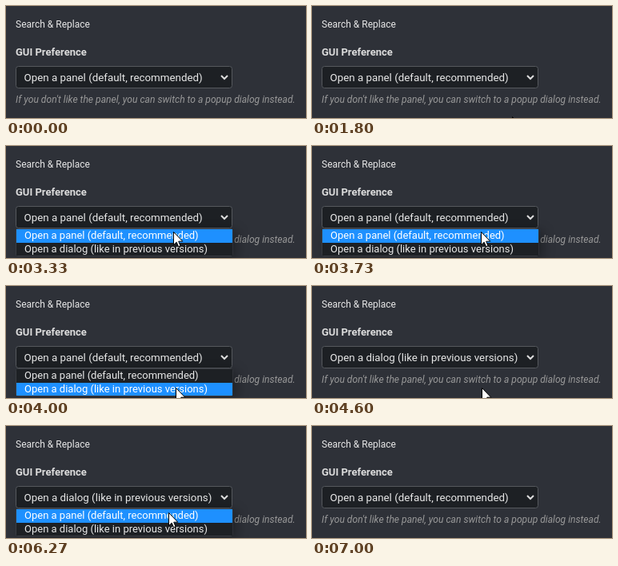
Recreate the animation shown at these times as an HTML page. Size 375x140 px, loop 8.39 s.

```html
<!DOCTYPE html>
<html lang="en">
<head>
<meta charset="utf-8">
<title>GUI preference</title>
<style>
  html, body { margin: 0; width: 100%; height: 100%; overflow: hidden; background: #2e3138; }
  svg { display: block; width: 375px; height: 140px; }
  text { font: 13px Roboto, sans-serif; fill: #e8e8e8; }
  .title { font-size: 12px; }
  .label { font-weight: 700; fill: #ddd; }
  .value { font-size: 13.333px; }
  .hint { font-size: 12.1px; font-style: italic; fill: #999; }
  .option rect { fill: #1d2024; }
  .option.active rect { fill: #1e90ff; }
  .option.active text { fill: #fff; }
  #opening, #list { filter: drop-shadow(6px 3px 7px rgba(0, 0, 0, .3)); }
</style>
</head>
<body>
<svg viewBox="0 0 375 140">
  <rect width="375" height="140" fill="#2e3138"/>
  <text class="title" x="12" y="27">Search &amp; Replace</text>
  <text class="label" x="12" y="62">GUI Preference</text>
  <rect x="12.5" y="75.5" width="270" height="27" rx="3" fill="#1d2024" stroke="#55585d"/>
  <text class="value" id="value" x="22.5" y="94"></text>
  <path d="M269 87l4 4l4-4" fill="none" stroke="#ddd" stroke-width="2"/>
  <text class="hint" x="12" y="121">If you don't like the panel, you can switch to a popup dialog instead.</text>

  <rect id="opening" x="13" y="104" width="269" height="33" rx="7"
        fill="none" stroke="#484b52" stroke-width="2"/>
  <g id="list">
    <rect x="12.5" y="103.5" width="270.5" height="34" rx="2" fill="#1d2024" stroke="#3a3d43"/>
    <g class="option">
      <rect x="13" y="104" width="270" height="17"/>
      <text x="23" y="116"></text>
    </g>
    <g class="option">
      <rect x="13" y="121" width="270" height="16"/>
      <text x="23" y="133"></text>
    </g>
  </g>
  <path id="cursor" d="M.5 .5V16.7L4.2 13.2L6.6 18.8L9 17.8L6.7 12.2H11.8Z"
        fill="#fff" stroke="#000" stroke-width="1"/>
</svg>
<script>
const LOOP = 8390;
const FPS = 15;
const LABELS = ['Open a panel (default, recommended)', 'Open a dialog (like in previous versions)'];

// Pointer moves; times are in ticks of 1/15 s. "bend" holds two Bezier control points.
const MOVES = [
  { start: 27, end: 33, from: [250, 138], to: [207, 88] },
  { start: 47, end: 53, from: [207, 88], to: [210, 125] },
  { start: 56, end: 60, from: [211, 107], to: [212, 127] },
  { start: 76, end: 86, from: [212, 127], to: [200, 89], bend: [[400, -40], [-32, -40]] },
  { start: 92, end: 94, from: [200, 89], to: [203, 108] }
];
const LEAVE = 105;

const byId = id => document.getElementById(id);
const [value, opening, list, cursor] = ['value', 'opening', 'list', 'cursor'].map(byId);
const options = [...document.querySelectorAll('.option')];
options.forEach((option, i) => option.querySelector('text').textContent = LABELS[i]);

const show = (node, on) => node.style.visibility = on ? 'visible' : 'hidden';
const within = (tick, start, end) => tick >= start && tick < end;
const smooth = p => p * p * (3 - 2 * p);

function pointerAt(tick) {
  const move = MOVES.findLast(m => m.start <= tick);
  if (!move || tick >= LEAVE) return null;
  const { start, end, from, to, bend = [from, to] } = move;
  const p = smooth(Math.min(1, (tick - start) / (end - start)));
  const q = 1 - p;
  return [0, 1].map(k => Math.round(
    q ** 3 * from[k] + 3 * q * q * p * bend[0][k] + 3 * q * p * p * bend[1][k] + p ** 3 * to[k]));
}

function hoveredRow(pointer, selected) {
  if (!pointer || pointer[1] < 104) return selected;
  return pointer[1] < 121 ? 0 : 1;
}

function draw() {
  // Half a centisecond of slack keeps whole ticks on the right side of rounding.
  const tick = Math.floor((performance.now() % LOOP + 5) * FPS / 1000);
  const pointer = pointerAt(tick);
  const selected = within(tick, 69, 104) ? 1 : 0;
  const active = hoveredRow(pointer, selected);

  value.textContent = LABELS[selected];
  show(opening, tick === 42);
  show(list, within(tick, 43, 69) || within(tick, 90, 104));
  options.forEach((option, i) => option.classList.toggle('active', i === active));
  show(cursor, pointer);
  if (pointer) cursor.setAttribute('transform', `translate(${pointer})`);
  requestAnimationFrame(draw);
}
draw();
</script>
</body>
</html>
```
